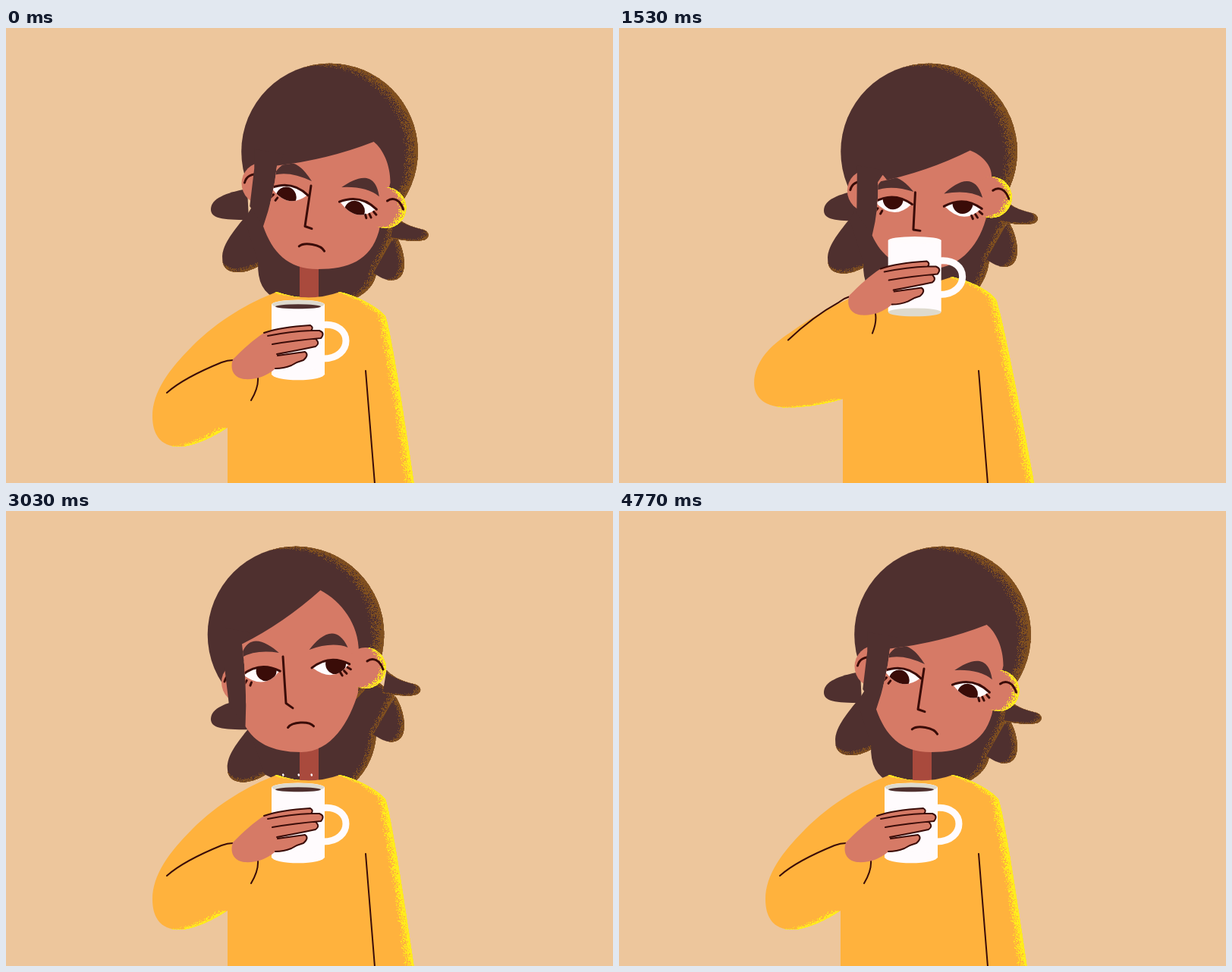
An HTML page with a canvas that plays this animation: 800 by 600 pixels, repeating every 4.8 s.

```html
<!DOCTYPE html>
<html lang="en">
<head>
<meta charset="utf-8">
<title>Coffee break</title>
<style>
html, body { margin: 0; width: 100%; height: 100%; overflow: hidden; background: #edc69c; }
canvas { display: block; }
</style>
</head>
<body>
<canvas id="stage" width="800" height="600"></canvas>
<script>
const ctx = document.getElementById('stage').getContext('2d');
const LOOP = 4800;
const HAIR = '#4f302f', SKIN = '#d67a66', INK = '#3a0c08', SHIRT = '#ffb23d',
      CHINA = '#fffbfd', GREY = '#dedace', NECK = '#a94a3d';

// Head keys: everything else on the head follows from skull, eyes and tilt
const key = (time, skull, eyeX, eyeY, tilt, gazeX, gazeY) => ({ time, skull, eyeX, eyeY, tilt, gazeX, gazeY });
const lookDown = [426.5, 419, 224, .2, -3, 9], sip = [399, 403, 233.5, .015, .5, -5],
      lookLeft = [382, 382, 208, -.1, 7, -1], lookRight = [397, 421, 210.5, -.01, -5, -3];
const keys = [
  key(0, ...lookDown), key(870, ...lookDown), key(1260, 420, 413.5, 231.5, .13, -2, -2.5),
  key(1830, ...sip), key(2370, ...sip), key(3010, ...lookLeft), key(3120, ...lookLeft),
  key(3540, ...lookRight), key(3930, ...lookRight), key(4260, 414, 425, 215.5, .09, -4, 10),
  key(4770, ...lookDown), key(LOOP, ...lookDown)
];

const clamp = v => Math.max(0, Math.min(1, v));
const smooth = (t, from, to) => { const x = clamp((t - from) / (to - from)); return x * x * (3 - 2 * x); };

// Monotone cubic interpolation through the keys
function poseAt(t) {
  const i = keys.findIndex((k, n) => t < keys[n + 1].time);
  const span = keys[i + 1].time - keys[i].time, u = (t - keys[i].time) / span, v = 1 - u;
  const pose = {};
  for (const name in keys[0]) {
    const slope = k => keys[k] && keys[k + 1]
      ? (keys[k + 1][name] - keys[k][name]) / (keys[k + 1].time - keys[k].time) : 0;
    const tangent = k => {
      const a = slope(k - 1), b = slope(k);
      return a * b > 0 ? 2 * a * b / (a + b) : 0;
    };
    pose[name] = keys[i][name] * (1 + 2 * u) * v * v + keys[i + 1][name] * u * u * (3 - 2 * u) +
      span * u * v * (tangent(i) * v - tangent(i + 1) * u);
  }
  pose.turn = Math.max(0, pose.eyeX - pose.skull);
  pose.up = 225 - pose.eyeY;
  return pose;
}

// Grain tiles from dense to sparse, sharing one seeded noise field
const LAYERS = 7, TILE = 160;
let seed = 7;
const noise = Array.from({ length: TILE * TILE }, () => (seed = seed * 16807 % 2147483647) / 2147483647);
const grain = color => Array.from({ length: LAYERS }, (_, k) => {
  const tile = document.createElement('canvas');
  tile.width = tile.height = TILE;
  const g = tile.getContext('2d');
  g.fillStyle = color;
  noise.forEach((v, i) => { if (v < 1 - k * .15) g.fillRect(i % TILE, Math.floor(i / TILE), 1, 1); });
  return ctx.createPattern(tile, 'repeat');
});
const brownGrain = grain('#81501f'), yellowGrain = grain('#ffed1d');

// Grainy light along the side of a shape that faces (dx, dy)
function rim(path, tiles, dx, dy) {
  ctx.save();
  ctx.clip(path);
  tiles.forEach((tile, k) => {
    const s = (k + 1) / LAYERS, rest = new Path2D();
    rest.rect(-900, -900, 2600, 2600);
    rest.addPath(path, new DOMMatrix([1, 0, 0, 1, -dx * s, -dy * s]));
    ctx.fillStyle = tile;
    ctx.fill(rest, 'evenodd');
  });
  ctx.restore();
}
function fill(path, color) { ctx.fillStyle = color; ctx.fill(path); }
function stroke(path, width, color = INK) {
  ctx.lineWidth = width;
  ctx.strokeStyle = color;
  ctx.stroke(path);
}
// Relative SVG path placed at (x, y)
function at(x, y, d) { return new Path2D(`M${x} ${y}${d}`); }
function ellipse(x, y, rx, ry = rx) {
  const p = new Path2D();
  p.ellipse(x, y, rx, ry, 0, 0, 7);
  return p;
}
function lock(path, dx, dy) { fill(path, HAIR); rim(path, brownGrain, dx, dy); }

function backHair({ skull, eyeX, tilt, turn, up }) {
  const lowX = 301 + .7 * up - .6 * (eyeX - skull), lowY = 335 - 70 * tilt + .9 * up;
  const lobeX = 508 - 1.4 * turn, lobeY = 310 + 110 * tilt + .5 * turn + .3 * up;
  const flickX = 550 + 35 * tilt - 1.6 * turn, flickY = 244 + 140 * tilt + .4 * turn + .3 * up;
  fill(at(270, lowY - 83, 'c0-14 20-22 48-27l2 41c-36 0-50-2-50-14'), HAIR);
  lock(at(lowX + 8, lowY - 72, 'c-16 20-30 37-29 54c0 16 13 19 25 18c14-2 24-8 51-25'), 2, 6);
  const mid = new Path2D();
  mid.moveTo(skull - 80, 200);
  mid.lineTo(lowX + 8, lowY - 70);
  mid.lineTo(lowX + 26, lowY - 14);
  mid.quadraticCurveTo(lowX + 24, 348, lowX + 52, 357);
  mid.lineTo(lobeX - 48, 357);
  mid.quadraticCurveTo(lobeX - 23, lobeY + .6 * (352 - lobeY), lobeX - 20, lobeY - 9);
  mid.lineTo(lobeX + 4, lobeY - 60);
  mid.lineTo(skull + 80, 200);
  lock(mid, 11, 2);
  lock(at(lobeX + 5, lobeY - 60, 'c13 20 19 56-1 60c-9 2-18-3-28-9'), 9, 1);
  lock(at(flickX - 45, flickY - 25, 'c13 13 27 16 39 19c8 4 7 10 1 13c-13 3-25 1-45-2'), 8, 3);
}

// q is how far the arm has lifted the mug
function body(q) {
  const left = 292 + 3 * q, elbow = 193 - 15 * q, under = 552 - 52 * q;
  const p = new Path2D();
  p.moveTo(left, 610);
  p.lineTo(left, 527 - 38 * q);
  p.bezierCurveTo(270, 541 - 45 * q, 246, under, 228 - 6 * q, under);
  p.bezierCurveTo(203 - 11 * q, under, elbow, 535 - 48 * q, elbow, 512 - 44 * q);
  p.bezierCurveTo(elbow, 480 - 40 * q, 215 - 15 * q, 450 - 32 * q, 245 - 20 * q, 420 - 18 * q);
  p.bezierCurveTo(280 - 25 * q, 385 - 5 * q, 320 - 35 * q, 362 + 2 * q, 357 - 7 * q, 348 - 12 * q);
  p.quadraticCurveTo(398, 363 - 20 * q, 440 - q, 348 - 20 * q);
  p.bezierCurveTo(465 - 3 * q, 354 - 21 * q, 490 - 2 * q, 368 - 23 * q, 500 - 3 * q, 380 - 22 * q);
  p.quadraticCurveTo(509 - 2 * q, 405 - 20 * q, 539 + 10 * q, 610);
  fill(p, SHIRT);
  rim(p, yellowGrain, 13, 1);

  const folds = new Path2D('M474 452L486 601');
  folds.moveTo(212 + 11 * q, 481 - 70 * q);
  folds.bezierCurveTo(232 + 13 * q, 463 - 73 * q, 262 + 8 * q, 450 - 78 * q, 284 + 6 * q, 441 - 80 * q);
  folds.quadraticCurveTo(292 + 4 * q, 438 - 82 * q, 299 + 4 * q, 438 - 84 * q);
  folds.moveTo(332 + 6 * q, 461 - 85 * q);
  folds.quadraticCurveTo(333 + 7 * q, 474 - 87 * q, 323 + 11 * q, 491 - 89 * q);
  stroke(folds, 2);
}

const eyeShape = new Path2D('M-24 1Q0-15 24 1Q2 25-24 1Z');
const lid = new Path2D('M-25 1Q0-15 25 1');
const brow = new Path2D('M-26-19C-10-36 13-51 25-17Q5-27-26-19Z');
const lashes = { '-1': new Path2D('M-14 12l-2 4M-20 9l-3 4'), 1: new Path2D('M12 11l2 4M17 9l3 4M22 5l4 3') };

function eye(side, face, { eyeX, eyeY, tilt, gazeX, gazeY, up }) {
  ctx.save();
  if (side < 0) ctx.clip(face);
  ctx.translate(eyeX, eyeY);
  ctx.rotate(tilt);
  ctx.translate(side * 46, 0);
  ctx.save();
  ctx.translate(0, 1 - .3 * up);
  ctx.scale(side, 1);
  fill(brow, HAIR);
  ctx.restore();
  fill(eyeShape, CHINA);
  ctx.save();
  ctx.clip(eyeShape);
  fill(ellipse(gazeX, gazeY, 13.5), INK);
  ctx.restore();
  stroke(lid, 3);
  stroke(lashes[side], 3);
  ctx.restore();
}

function head(pose) {
  const { skull, eyeX, eyeY, tilt, turn, up } = pose, yaw = eyeX - skull;
  lock(ellipse(skull, 163, 116.3), 18, -4);

  const earX = skull - 104 - 60 * tilt, earY = 219 - 70 * tilt, strandX = skull - 94 + .7 * yaw;
  fill(ellipse(earX + 28, earY, 28), SKIN);
  stroke(at(earX + 4, earY - 1, 'c2-8 7-12 24-12'), 3);

  // Face outline: strand end, jaw, temple, fringe apex, strand top
  const endX = eyeX - 71 - 45 * tilt, endY = 278 + .6 * yaw - 60 * tilt;
  const chin = eyeX + 2 - 50 * tilt;
  const jawX = eyeX + 78 - 40 * tilt - .3 * yaw, jawY = 247 + 75 * tilt - .9 * yaw;
  const templeX = skull + 83 + .4 * yaw, templeY = 192 + 60 * tilt;
  const apexX = eyeX + 47 + 95 * tilt - .3 * up, apexY = 143 + 45 * tilt - 2 * up;
  const topX = eyeX - 68 + 30 * tilt, topY = eyeY - 30 - 60 * tilt - .5 * up;
  const bendX = (topX + endX) / 2 + 5, bendY = (topY + endY) / 2;

  const strand = new Path2D();
  strand.moveTo(strandX, topY - 22);
  strand.lineTo(strandX, earY - 20);
  strand.lineTo(strandX + 2 - 40 * tilt, earY + 30);
  strand.lineTo(endX, endY);
  strand.quadraticCurveTo(bendX, bendY, topX, topY);
  strand.lineTo(topX + 10, topY - 15);
  fill(strand, HAIR);

  const face = new Path2D(), rise = templeY - apexY;
  face.moveTo(endX, endY);
  face.bezierCurveTo(endX + 12, endY + (318 - endY) * .6, chin - 40, 318, chin, 318);
  face.bezierCurveTo(chin + 40, 318, jawX - 11, jawY + 38, jawX, jawY);
  face.lineTo(templeX, templeY);
  face.bezierCurveTo(templeX, templeY - .45 * rise, apexX + .55 * (templeX - apexX), apexY + .18 * rise, apexX, apexY);
  face.quadraticCurveTo((apexX + topX) / 2 + 3, (apexY + topY) / 2 + 8, topX, topY);
  face.quadraticCurveTo(bendX, bendY, endX, endY);
  fill(face, SKIN);

  const farX = skull + 86 - 60 * tilt - 1.1 * turn, farY = 217 + 100 * tilt + .9 * turn;
  const ear = ellipse(farX, farY, 27);
  fill(ear, SKIN);
  rim(ear, yellowGrain, 11, 2);
  const fold = clamp((farX + 20 - templeX) / 8);
  if (fold > 0) stroke(at(farX + 2, farY - 9, 'c8-6 17-1 21 11'), 3 * fold);

  eye(-1, face, pose);
  eye(1, face, pose);

  const nose = new Path2D();
  const noseX = eyeX - 17 + 1.25 * turn, cornerX = noseX - 40 * tilt + .3 * turn, cornerY = eyeY + 37 + .5 * up;
  nose.moveTo(noseX, eyeY - 16);
  nose.lineTo(cornerX, cornerY);
  nose.lineTo(cornerX + 9 - .85 * turn, cornerY + 3 + .2 * up);
  stroke(nose, 3);
  ctx.save();
  ctx.translate(eyeX - 1 - 75 * tilt, eyeY + 66 + .6 * up);
  ctx.rotate(tilt * .8);
  stroke(new Path2D('M-17 0C-11-7 11-7 17 1'), 3);
  ctx.restore();
}

const hand = new Path2D('M299 437C312 424 326 411 340 402C360 395 385 393 401 392Q406 395 402 399L413 399' +
  'Q421 402 415 409L408 411Q414 416 408 420L358 431L395 427Q400 431 392 438Q384 440 376 445Q366 449 354 450' +
  'C343 459 330 464 314 463C299 461 295 449 299 437Z');
const fingers = new Path2D('M340 402C360 395 385 393 401 392Q406 395 402 399Q375 400 345 406M402 399L413 399' +
  'Q421 402 415 409Q380 412 351 417M409 411Q414 416 408 420Q385 425 357 430M358 432L394 427' +
  'Q400 431 392 438Q384 440 376 445Q366 449 355 449');
const handle = new Path2D('M418 391.5C458 388 458 436 418 436');

function mug(q) {
  ctx.save();
  ctx.translate(4.8 * q ** 4, -85 * q);
  stroke(handle, 9, CHINA);
  const top = 6 - 6.9 * q + 5.9 * q * q, base = 8 - 20 * q + 6.5 * q * q;
  ctx.fillStyle = CHINA;
  ctx.fillRect(350, 364.5, 70, 92 + 2 * q);
  fill(ellipse(385, 364.5, 35, top), CHINA);
  fill(ellipse(385, 456.3 + 3 * q, 35, Math.abs(base)), base < 0 ? GREY : CHINA);
  ctx.globalAlpha = clamp(2.8 - 2.8 * q);
  fill(ellipse(385, 364.5, 34.5, top - .3), GREY);
  ctx.globalAlpha = 1;
  const coffee = 1 - 1.25 * q;
  if (coffee > 0) fill(ellipse(385, 367.3 + 2 * q, 30 * coffee, 3 * coffee), HAIR);
  fill(hand, SKIN);
  stroke(fingers, 2);
  ctx.restore();
}

function steam(t) {
  if (t < 3010 || t > 4350) return;
  const rise = 24 * clamp((t - 3010) / 530) + 14 * clamp((t - 3540) / 720);
  const tail = 27 * smooth(t, 3540, 4260);
  const puffs = new Path2D();
  for (const x of [362, 382.5, 399.5])
    for (let d = tail; d <= rise + .5; d += .5) {
      const px = x + 3.4 * Math.cos(d * Math.PI / 7.75), py = 348.5 - d;
      d === tail ? puffs.moveTo(px, py) : puffs.lineTo(px, py);
    }
  ctx.globalAlpha = clamp((4350 - t) / 450);
  stroke(puffs, 2.4, CHINA);
  ctx.globalAlpha = 1;
}

function draw(t) {
  ctx.fillStyle = '#edc69c';
  ctx.fillRect(0, 0, 800, 600);
  const pose = poseAt(t);
  if (t > 1860 && t < 2400) pose.gazeX -= 3.5 * Math.sin((t - 1860) / 540 * 2 * Math.PI);
  const lift = smooth(t, 750, 1570) - smooth(t, 2370, 2980);
  backHair(pose);
  ctx.fillStyle = NECK;
  ctx.fillRect(387, 290, 25, 67);
  body(lift);
  head(pose);
  mug(lift);
  steam(t);
}

ctx.lineCap = ctx.lineJoin = 'round';
const start = performance.now();
function tick() {
  draw((performance.now() - start) % LOOP);
  requestAnimationFrame(tick);
}
tick();
</script>
</body>
</html>
```
